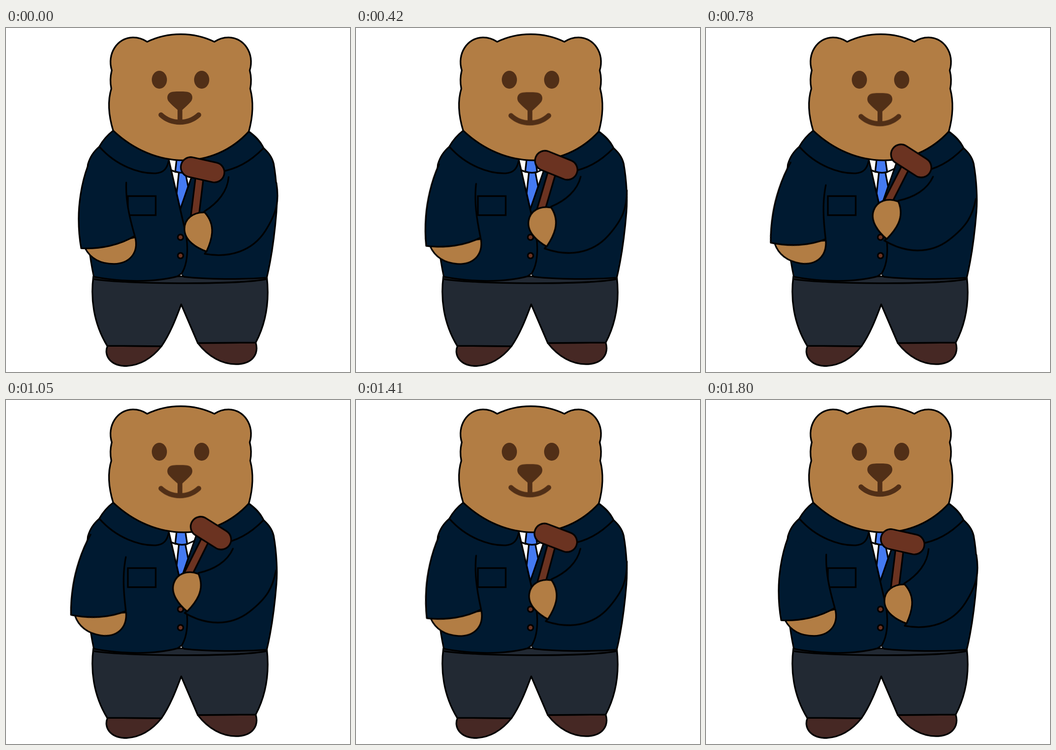
Animation, 748 px wide and 748 px high, one loop 1.83 s. Source, as an HTML page:

```html
<!DOCTYPE html>
<html lang="en">
<head>
<meta charset="utf-8">
<title>Bear with gavel</title>
<style>
  html, body { margin: 0; width: 100%; height: 100%; overflow: hidden; background: #fff; }
  svg { display: block; width: 100vw; height: 100vh; }

  .line { fill: none; }
  .fur { fill: #b27d44; }
  .face { fill: #512f17; stroke: none; }
  .navy { fill: #001a31; }
  .pants { fill: #222933; }
  .shoe { fill: #462824; }
  .wood { fill: #6b3321; }
  .tie { fill: #447af2; }
  .shirt { fill: #fff; }
  .bare { stroke: none; }

  /* Swing out for 900 ms, back for 900 ms, rest for 30 ms. */
  .snout, .sleeve, .gavel-arm {
    animation: 1830ms cubic-bezier(.37, 0, .63, 1) infinite;
  }
  .snout { animation-name: nod; }
  .sleeve { animation-name: sway; transform-origin: 227px 333px; }
  .gavel-arm { animation-name: raise; transform-origin: 491px 351px; }

  @keyframes nod {
    0%, 98.3607%, 100% { transform: translateY(0); }
    49.1803% { transform: translateY(3.6px); }
  }
  @keyframes sway {
    0%, 98.3607%, 100% { transform: rotate(0deg); }
    49.1803% { transform: rotate(9.7deg); }
  }
  @keyframes raise {
    0%, 98.3607%, 100% { transform: rotate(0deg); }
    49.1803% { transform: rotate(21deg); }
  }
</style>
</head>
<body>
<svg viewBox="0 0 748 748" stroke="#000" stroke-width="3.5" stroke-linecap="round" stroke-linejoin="round">
  <clipPath id="neck"><path d="M354 280L379 394L416 288V280Z"/></clipPath>

  <!-- Shoes and trousers -->
  <path class="shoe" d="M221 691C212 710 225 735 262 735C298 733 322 712 338 692Z"/>
  <path class="shoe" d="M417 685C440 715 470 731 500 731C537 731 550 708 543 684Z"/>
  <path class="pants" d="M190 540C184 585 189 640 220 691L338 692C357 665 370 630 381 601L417 685L543 684C566 640 573 590 567 540Z"/>
  <path class="line" d="M191 546C255 557 500 559 567 546"/>

  <!-- Jacket -->
  <path class="navy" d="M233 223C218 235 210 245 203 258C190 269 182 282 178 297C171 360 172 450 191 541C250 552 320 554 373 540L380 535L387 541C440 547 510 547 567 543C576 505 584 450 588 400C590 375 589 335 582 295C578 278 568 269 560 261C553 246 543 236 528 225Z"/>

  <!-- Shirt and tie -->
  <g clip-path="url(#neck)">
    <path class="shirt bare" d="M350 275H420V400H350Z"/>
    <path class="tie" d="M376 314L371 360L379 396L396 345L390 314Z"/>
    <path class="line" d="M356 308L369 313M392 314L412 305"/>
    <path class="tie" d="M371 286H390L394 313Q381 317 368 312Z"/>
  </g>
  <path class="line" d="M416 288L379 394"/>
  <path class="line" d="M354 287L386 425C389 440 394 455 394 475C395 503 389 524 380 537"/>
  <path class="shirt bare" d="M379.5 536.5h3v2h-3z"/>
  <circle class="wood" cx="379.5" cy="455" r="6"/>
  <circle class="wood" cx="379.5" cy="495" r="6"/>
  <path class="line" stroke-linejoin="miter" d="M265 365.500H325.500V407H265Z"/>

  <!-- Hanging arm -->
  <g class="sleeve">
    <path class="fur" d="M172 479C185 503 208 513 235 513C268 512 289 490 281 455Z"/>
    <path class="navy" d="M178 300C163 340 158 385 158 415C158 440 160 460 163.500 479C205 481 248 472 280 452C268 410 260 375 261.500 336"/>
  </g>

  <!-- Collar -->
  <path class="line" d="M203 258C240 300 290 317 325 316C343 315 351 305 354 287"/>
  <path class="line" d="M560 261C530 292 500 307 465 313"/>

  <!-- Head -->
  <path class="fur" d="M233 223C223 190 221 158 229 132C226 118 227 104 230 92C219 56 242 21 276 20.500C288 20.500 298 24 307 30C352 8 408 8 453 30C462 24 472 20.500 484 20.500C518 21 541 56 530 92C533 104 534 118 531 132C539 162 537 192 528 225C451 309 324 309 233 223Z"/>
  <g class="face">
    <ellipse cx="333.500" cy="112.500" rx="16.500" ry="19.500"/>
    <ellipse cx="425.500" cy="112.500" rx="16.500" ry="19.500"/>
  </g>
  <g class="snout">
    <path class="face" d="M378 138C388 138 395 138 400 141C406 145 407 154 402 160C397 166 390 172 383.500 178V202H373V178C366 172 359 166 354 160C349 154 350 145 356 141C361 138 368 138 378 138Z"/>
    <path class="line" stroke="#512f17" stroke-width="11" d="M337 189C360 210 396 210 419 189"/>
  </g>

  <!-- Raised arm -->
  <g class="gavel-arm">
    <path class="navy bare" d="M484 324C482 355 460 381 431 399L436 485L432 491C486 501 536 485 564 441C590 400 594 375 588 337Z"/>
    <path class="line" d="M484 324C482 355 460 381 431 399M436 485L432 491C486 501 536 485 564 441C590 400 594 375 588 337"/>
    <path class="wood" d="M412.500 322L429.500 325L419.500 408L402 408Z"/>
    <rect class="wood" x="379.500" y="286.500" width="96" height="43.500" rx="21.750" transform="rotate(12.500 427.500 308.250)"/>
    <path class="fur" d="M432 401C443 413 449 429 448 445C447 458 442 473 436 486C414 478 388 462 388 437C388 415 407 400 432 401Z"/>
  </g>
</svg>
</body>
</html>
```
